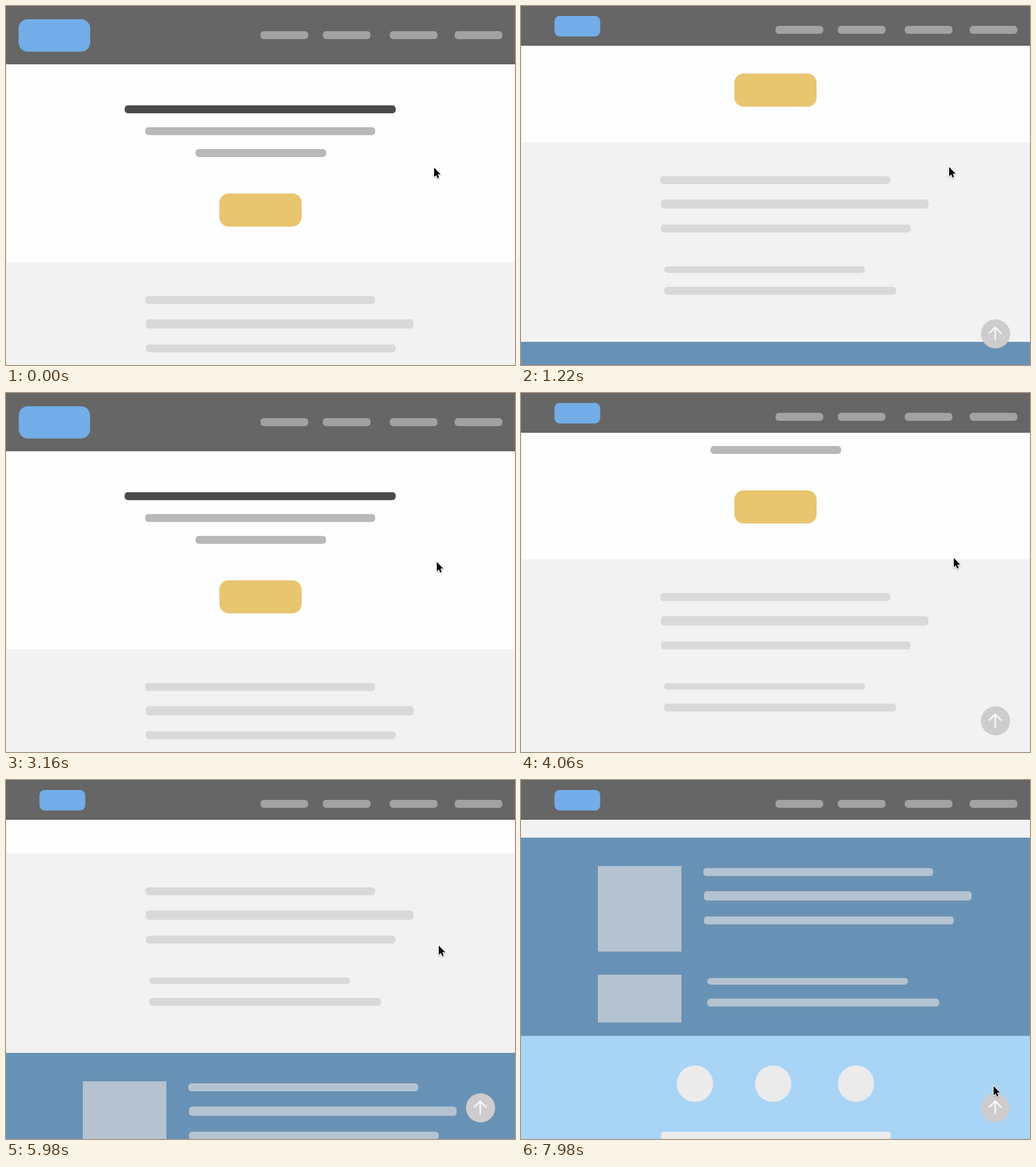
An HTML page with a canvas for the animation above (8000 ms loop, 768 by 542 pixels).

```html
<!DOCTYPE html>
<html lang="en">
<head>
<meta charset="utf-8">
<title>Shrinking header</title>
<style>
html, body { margin: 0; width: 100%; height: 100%; overflow: hidden; background: #fff; }
canvas { display: block; width: 768px; height: 542px; }
</style>
</head>
<body>
<canvas id="stage" width="768" height="542"></canvas>
<script>
const W = 768, H = 542, LOOP = 8000;
const ctx = document.getElementById('stage').getContext('2d');

const clamp = v => Math.max(0, Math.min(1, v));
const mix = (a, b, p) => a + (b - a) * p;
const easeOut = p => 1 - Math.pow(1 - p, 1.95);
const easeInOut = p => p * p * (3 - 2 * p);

// Each move: start ms, end ms, target value.
const scrollMoves = [
  [540, 760, 20], [920, 1480, 227], [1840, 2640, 0],
  [3160, 3880, 136], [5780, 6200, 330.7], [6360, 7080, 601]
];
const cursorX = [[2660, 2800, 650], [3160, 3400, 653], [7200, 7980, 713]];
const cursorY = [
  [20, 140, 243], [2660, 2800, 255], [3160, 3400, 249],
  [4800, 5040, 250], [7200, 7980, 462]
];

function follow(moves, value, t, ease) {
  for (const [start, end, target] of moves) {
    if (t <= start) break;
    value = mix(value, target, ease(clamp((t - start) / (end - start))));
  }
  return value;
}

function rect(x, y, w, h, color) {
  ctx.fillStyle = color;
  ctx.fillRect(x, y, w, h);
}

function pill(x, y, w, h, color, r = 5) {
  ctx.fillStyle = color;
  ctx.beginPath();
  ctx.roundRect(x, y, w, h, r);
  ctx.fill();
}

function disc(x, y, r, color) {
  ctx.fillStyle = color;
  ctx.beginPath();
  ctx.arc(x, y, r, 0, Math.PI * 2);
  ctx.fill();
}

function paragraph(x, y, color) {
  pill(x, y, 347, 12, color);
  pill(x + 1, y + 35, 404, 14, color);
  pill(x + 1, y + 73, 377, 12, color);
}

function note(x, y, color) {
  pill(x, y, 303, 10, color);
  pill(x, y + 31, 350, 12, color);
}

function drawPage(scroll) {
  ctx.save();
  ctx.translate(0, -scroll);

  rect(0, 0, W, 387, '#fefefe');
  rect(0, 0, 1, 387, '#f0f0f0');
  rect(W - 1, 0, 1, 387, '#f0f0f0');
  pill(179, 150, 409, 12, '#4b4b4b');
  pill(210, 183, 347, 12, '#b8b8b8');
  pill(286, 216, 197, 12, '#b8b8b8');
  pill(322, 283, 124, 50, '#e8c56f', 14);

  rect(0, 387, W, 301, '#f2f2f2');
  paragraph(210, 438, '#d9d9d9');
  note(216, 574, '#d9d9d9');

  rect(0, 688, W, 299.5, '#6892b5');
  rect(116, 731, 126, 129, '#b5c3d0');
  rect(116, 895, 126, 72, '#b5c3d0');
  paragraph(275, 734, '#b5c3d0');
  note(281, 900, '#b5c3d0');

  rect(0, 987.5, W, 300, '#a8d4f6');
  for (const x of [262.5, 380.5, 505.5]) disc(x, 1059.5, 27.5, '#ebebeb');
  pill(211, 1132, 347, 12, '#ebebeb');

  ctx.restore();
}

function drawHeader(p) {
  const h = mix(88, 60, p);
  rect(0, 0, W, h, '#666');
  rect(0, h - 1, W, 1, '#5e5e5e');
  pill(mix(19, 50.5, p), mix(20, 15, p), mix(108, 69, p), mix(49, 31, p),
    '#72ade8', mix(14, 8, p));
  for (const x of [384, 478, 579, 677]) pill(x, mix(38, 30, p), 72, 12, '#a2a2a2');
}

function drawTopButton(alpha) {
  if (!alpha) return;
  ctx.save();
  ctx.globalAlpha = alpha;
  disc(716, 495, 22, '#cecccd');
  ctx.strokeStyle = '#fff';
  ctx.lineWidth = 2;
  ctx.beginPath();
  ctx.moveTo(715.5, 505);
  ctx.lineTo(715.5, 485);
  ctx.moveTo(706, 494.5);
  ctx.lineTo(715.5, 485);
  ctx.lineTo(725, 494.5);
  ctx.stroke();
  ctx.restore();
}

function drawCursor(x, y) {
  ctx.save();
  ctx.translate(x, y);
  ctx.beginPath();
  ctx.moveTo(0, 0);
  ctx.lineTo(0, 14);
  ctx.lineTo(3.1, 11.2);
  ctx.lineTo(5.2, 16);
  ctx.lineTo(7.4, 15.1);
  ctx.lineTo(5.4, 10.3);
  ctx.lineTo(9.6, 10.1);
  ctx.closePath();
  ctx.shadowColor = 'rgba(0,0,0,.3)';
  ctx.shadowBlur = 2;
  ctx.shadowOffsetY = 1;
  ctx.strokeStyle = '#fff';
  ctx.lineWidth = 2;
  ctx.lineJoin = 'round';
  ctx.stroke();
  ctx.shadowColor = 'transparent';
  ctx.fillStyle = '#000';
  ctx.fill();
  ctx.restore();
}

function draw(t) {
  const scroll = follow(scrollMoves, 0, t, easeOut);
  drawPage(scroll);
  drawHeader(clamp(scroll / 40));
  drawTopButton(clamp((scroll - 20) / 50));
  drawCursor(follow(cursorX, 646, t, easeInOut), follow(cursorY, 244, t, easeInOut));
}

const began = performance.now();
function tick() {
  draw((performance.now() - began) % LOOP);
  requestAnimationFrame(tick);
}
tick();
</script>
</body>
</html>
```
